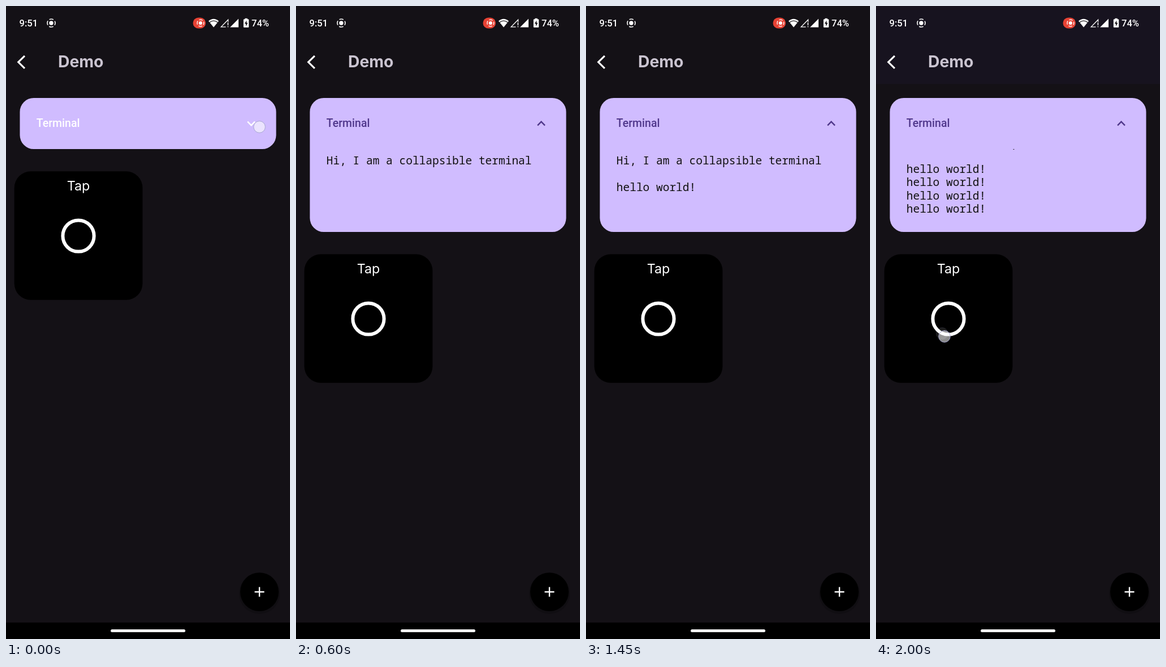
Write an HTML page that moves like this. It is 502 px wide and 1115 px high and loops after 2050 ms.

```html
<!DOCTYPE html>
<html lang="en">
<head>
<meta charset="utf-8">
<title>Collapsible terminal</title>
<style>
  html, body { margin: 0; height: 100%; overflow: hidden; background: #141116; }
  #stage { display: block; width: 100vw; height: 100vh; }
  text { white-space: pre; }
  .status { font: 500 16.6px Roboto, sans-serif; fill: #fff; }
  .mono { font: 19.5px "Noto Sans Mono", monospace; fill: #111; }
  .line { fill: none; stroke: #fff; }
</style>
</head>
<body>
<svg id="stage" viewBox="0 0 502 1115">
  <rect width="502" height="1115" fill="#141116"/>
  <rect id="bar" width="502" height="137.5" fill="#17131f"/>

  <!-- status bar -->
  <text class="status" x="23.5" y="36" textLength="">9:51</text>
  <g id="record" transform="translate(80 30)">
    <circle r="3.7" fill="#fff"/>
    <circle class="line" r="7" stroke-width="1.6" stroke-dasharray="7.6 3.4" stroke-dashoffset="3.8"/>
  </g>
  <rect x="330.5" y="20.5" width="22.5" height="19" rx="9.5" fill="#e64234"/>
  <use href="#record" transform="translate(276.6 4.8) scale(.84)" x="0" y="0"/>
  <path fill="#fff" d="M358 26.5Q367 19 376 26.5L367 37.5Z"/>
  <path class="line" stroke="#141116" stroke-width="1.3" style="stroke:#141116" d="M360 28.7Q367 23.6 374 28.7"/>
  <path class="line" stroke-width="1.3" d="M388.5 36.8H380.2L392.6 24.2V28"/>
  <path class="line" stroke-width="1.5" d="M392.4 29V34M392.4 35.5V37.3"/>
  <path fill="#fff" d="M396 37.5L411 22.5V37.5Z"/>
  <path fill="#fff" d="M422.3 23.3V21.8H426.7V23.3H428.2Q429.2 23.3 429.2 24.3V36.8Q429.2 37.8 428.2 37.8H420.8Q419.8 37.8 419.8 36.8V24.3Q419.8 23.3 420.8 23.3Z"/>
  <path fill="#141116" d="M425.3 25.5L421.8 31.3H424V35.7L427.4 29.8H425.3Z"/>
  <text class="status" x="434" y="36">74%</text>

  <!-- title -->
  <path class="line" stroke-width="3.2" d="M33 87.8L21.8 98.8L33 109.8"/>
  <text x="92" y="108" font-family="Inter, sans-serif" font-weight="700" font-size="28.3" fill="#cac4d0">Demo</text>

  <!-- terminal -->
  <rect id="card" x="24.5" y="162" width="453" height="90" rx="24.5" fill="#d0bcff"/>
  <text id="heading" x="53.8" y="213.3" font-family="Roboto, sans-serif" font-weight="500" font-size="19.5">Terminal</text>
  <path id="chevron" d="M4.59-3.41L0 1.17L-4.59-3.41L-6-2L0 4L6-2Z"/>
  <svg id="body" x="24" y="242" width="453" height="0">
    <svg id="view" width="453" height="116.5"><g id="lines"></g></svg>
  </svg>

  <!-- tile -->
  <g id="tile">
    <rect x="14.7" y="291.3" width="226.7" height="226.5" rx="29"/>
    <text x="128" y="324.5" text-anchor="middle" font-family="Inter, sans-serif" font-size="23.3" fill="#fff">Tap</text>
    <circle class="line" cx="128" cy="405" r="27.6" stroke-width="6"/>
  </g>

  <!-- add button and navigation -->
  <circle cx="448" cy="1035" r="36" fill="#000" opacity=".2"/>
  <circle cx="448" cy="1032" r="34"/>
  <path class="line" stroke-width="2.4" d="M439.5 1032H456.5M448 1023.5V1040.5"/>
  <rect y="1086" width="502" height="29"/>
  <rect x="185" y="1098" width="132" height="5" rx="2.5" fill="#f4f4f4"/>

  <g id="dots"></g>
</svg>
<script>
const LOOP = 2050, OPEN_AT = 34, OPEN_TIME = 200, BODY = 146, ROW = 23.3, FADE = 200;
const $ = id => document.getElementById(id);
const clamp = v => Math.min(1, Math.max(0, v));
const set = (el, attrs) => { for (const k in attrs) el.setAttribute(k, attrs[k]); };
const add = (parent, tag, attrs) => {
  const el = document.createElementNS(parent.namespaceURI, tag);
  set(el, attrs);
  return parent.appendChild(el);
};

const taps = [
  { x: 448, y: 213, down: -1, up: 40 },
  { x: 112.5, y: 555, down: 1000, up: 1240 },
  { x: 112, y: 574, down: 1550, up: 1640 },
  { x: 116.8, y: 576.8, down: 1740, up: 1840 },
  { x: 121, y: 582, down: 1930, up: 1990 }
];
for (const tap of taps) {
  tap.dot = add($('dots'), 'circle', {
    cx: tap.x, cy: tap.y, r: 10.3, fill: 'rgba(255,255,255,.58)', stroke: '#a9a9d2', 'stroke-width': 1
  });
}

const rows = ['Hi, I am a collapsible terminal', ...Array(4).fill('hello world!')].map((words, i) => {
  const row = add($('lines'), 'text', { class: 'mono', x: 29.8, y: 27 + ROW * (i && i + 1) });
  row.textContent = words;
  return row;
});

// cubic-bezier(.42, 0, 1, 1)
function easeIn(x) {
  let lo = 0, hi = 1;
  for (let i = 0; i < 20; i++) {
    const s = (lo + hi) / 2;
    const at = 1.26 * s * (1 - s) ** 2 + 3 * s * s * (1 - s) + s ** 3;
    if (at < x) lo = s; else hi = s;
  }
  return lo * lo * (3 - 2 * lo);
}

const tint = p => `rgb(${[79, 55, 139].map(c => Math.round(255 + (c - 255) * p))})`;

function draw(t) {
  const since = t - OPEN_AT;
  const progress = clamp(since / OPEN_TIME);
  const open = since >= OPEN_TIME ? 1 : since <= 0 ? 0 : easeIn(progress);
  set($('card'), { height: 90 + BODY * open });
  set($('body'), { height: BODY * open });
  set($('view'), { y: 10 - BODY / 2 * (1 - open) });
  set($('tile'), { transform: `translate(0 ${BODY * open})` });
  set($('chevron'), { transform: `translate(433.5 207) rotate(${180 * open}) scale(1.22)`, fill: tint(open) });
  // the heading colour trails behind the expansion
  set($('heading'), { fill: tint(.3 * progress ** 2 + .7 * clamp(since / OPEN_TIME - 1)) });

  const count = taps.filter((tap, i) => i && t >= tap.up).length;
  rows.forEach((row, i) => set(row, { visibility: i <= count ? 'visible' : 'hidden' }));
  const scroll = count > 2 ? 8.2 + ROW * (count - 3) : 0;
  set($('lines'), { transform: `translate(0 ${-scroll})` });
  set($('bar'), { opacity: scroll ? 1 : 0 });

  for (const { dot, down, up } of taps) {
    set(dot, { opacity: t < down ? 0 : 1 - clamp((t - up) / FADE) });
  }
}

function tick() {
  draw(performance.now() % LOOP);
  requestAnimationFrame(tick);
}
tick();
</script>
</body>
</html>
```
